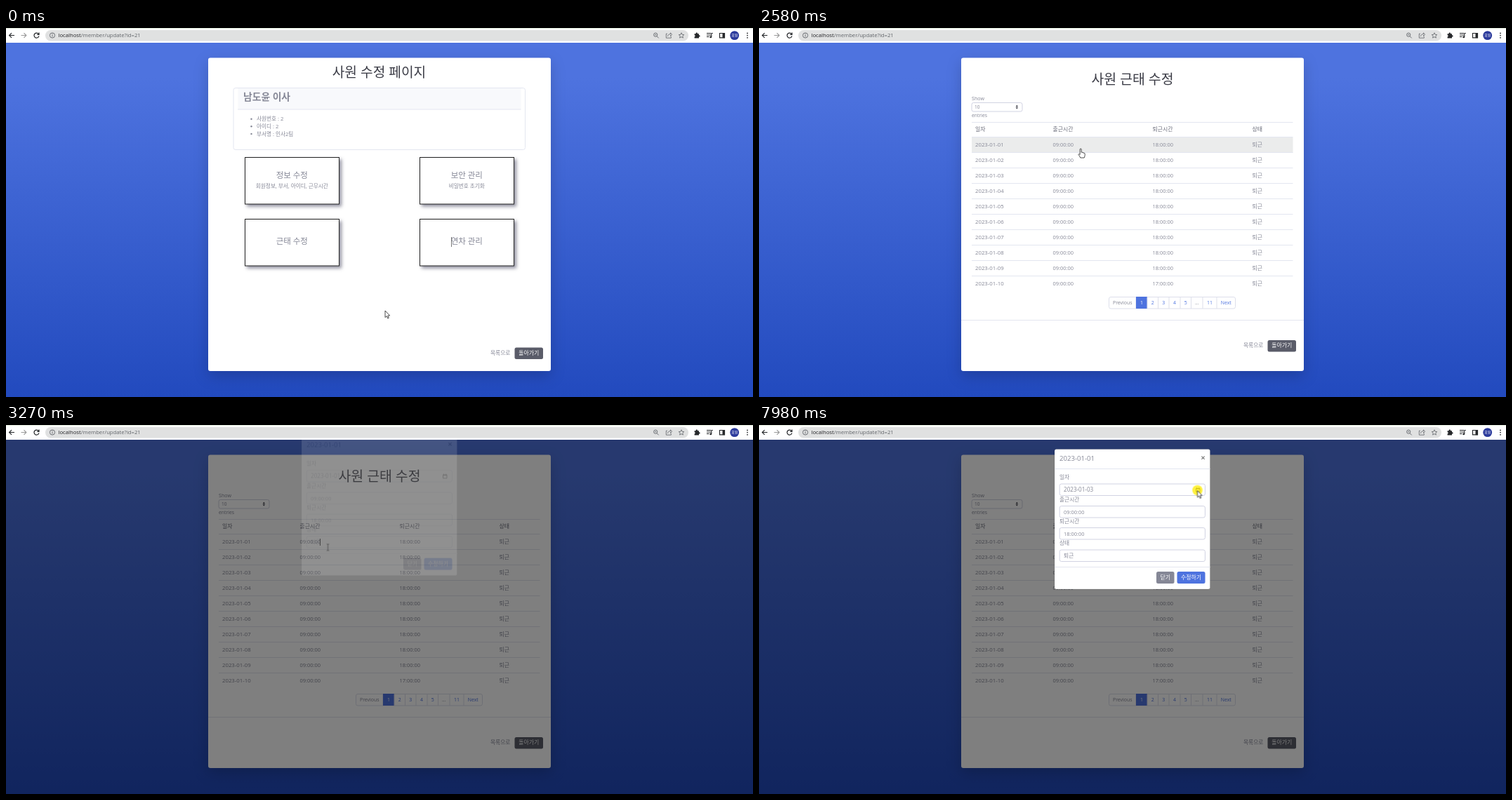
Write an HTML page that moves like this. It is 1064x526 px and loops after 8 s.

```html
<!DOCTYPE html>
<html lang="ko">
<head>
<meta charset="utf-8">
<title>사원 수정 페이지</title>
<style>
html, body { margin: 0; width: 100%; height: 100%; overflow: hidden; background: #fff; }
svg { display: block; width: 1064px; height: 526px; }
text { font-family: "Open Sans", "Noto Sans CJK KR", "Noto Sans CJK", sans-serif; white-space: pre; }
.mid { text-anchor: middle; }
.bold { font-weight: 700; }
.medium { font-weight: 500; }
.light { font-weight: 300; }
.calendar text { font-family: "Liberation Sans", "Noto Sans CJK KR", "Noto Sans CJK", sans-serif; }
.card { filter: drop-shadow(0 7px 10px rgba(0,0,0,.175)); }
.option { filter: drop-shadow(3.5px 3.5px 2.5px rgba(70,70,95,.6)); }
.popup { filter: drop-shadow(0 1px 2px rgba(0,0,0,.5)); }

/* One percent of the loop is 80 ms. */
.anim { animation: 8s step-end infinite; }
.first { animation-name: first; }
.second { animation-name: second; }
.caret { animation-name: caret; }
.row-caret { animation-name: rowCaret; }
.row-hover { animation-name: rowHover; }
.backdrop { animation-name: backdrop; animation-timing-function: linear; }
.modal { animation-name: fade, drop; animation-duration: 8s; animation-iteration-count: infinite;
  animation-timing-function: linear, ease-out; }
.calendar { animation-name: calendar; }
.day-hover { animation-name: dayHover; }
.old-date { animation-name: oldDate; }
.new-date { animation-name: newDate; }
.pointer { animation-name: pointer; animation-timing-function: ease-in-out; }
.arrow { animation-name: arrow; }
.hand { animation-name: hand; }
.beam { animation-name: beam; }
.press { animation-name: press; }

@keyframes first { 0% { opacity: 1 } 17.625%, 100% { opacity: 0 } }
@keyframes second { 0% { opacity: 0 } 17.625%, 100% { opacity: 1 } }
@keyframes caret { 0% { opacity: 1 } 6.5%, 100% { opacity: 0 } }
@keyframes rowCaret { 0% { opacity: 0 } 38%, 100% { opacity: 1 } }
@keyframes rowHover {
  0%, 24.25% { opacity: 1; transform: translateY(153.6px); animation-timing-function: steps(7) }
  27% { opacity: 0; transform: none }
  30.9%, 38.6% { opacity: 1; transform: none }
  38.7%, 100% { opacity: 0; transform: none }
}
@keyframes backdrop { 0%, 38.6875% { opacity: 0 } 40.5625%, 100% { opacity: .5 } }
@keyframes fade { 0%, 40.625% { opacity: 0 } 42.5%, 100% { opacity: 1 } }
@keyframes drop { 0%, 40.625% { transform: translateY(-22px) } 44.375%, 100% { transform: none } }
@keyframes calendar { 0% { opacity: 0 } 66% { opacity: 1 } 82.25%, 100% { opacity: 0 } }
@keyframes dayHover {
  0% { opacity: 0; transform: none }
  72.3% { opacity: 1; transform: none }
  74.5%, 100% { opacity: 1; transform: translateX(-12.55px) }
}
@keyframes oldDate { 0% { opacity: 1 } 82.25%, 100% { opacity: 0 } }
@keyframes newDate { 0% { opacity: 0 } 82.25%, 100% { opacity: 1 } }
@keyframes pointer {
  0%, 11.5% { transform: translate(540px, 403px) }
  15.875%, 24.25% { transform: translate(433.5px, 321.5px) }
  28% { transform: translate(452px, 63px) }
  32.25%, 39.5% { transform: translate(458px, 172px) }
  40.5%, 50.75% { transform: translate(458.5px, 173.5px) }
  57.625%, 69.25% { transform: translate(622px, 92.5px) }
  73.5% { transform: translate(472px, 141px) }
  76.125%, 88% { transform: translate(463px, 141px) }
  93.75% { transform: translate(633px, 98px) }
  97.25%, 100% { transform: translate(624.5px, 93.5px) }
}
@keyframes arrow {
  0% { opacity: 1 } 15.25% { opacity: 0 } 27% { opacity: 1 } 30.9% { opacity: 0 }
  38.7% { opacity: 1 } 40% { opacity: 0 } 42.5%, 100% { opacity: 1 }
}
@keyframes hand {
  0% { opacity: 0 } 15.25% { opacity: 1 } 27% { opacity: 0 } 30.9% { opacity: 1 } 38.7%, 100% { opacity: 0 }
}
@keyframes beam { 0% { opacity: 0 } 40% { opacity: 1 } 42.5%, 100% { opacity: 0 } }
@keyframes press {
  0% { opacity: 0 } 16.75% { opacity: .8 } 17.625% { opacity: 0 }
  38% { opacity: .8 } 38.6875% { opacity: 0 }
  64.25% { opacity: .8 } 66.875% { opacity: 0 }
  80.5% { opacity: .8 } 83.125% { opacity: 0 }
  98.125%, 100% { opacity: .8 }
}
</style>
</head>
<body>
<svg id="stage" viewBox="0 0 1064 526">
  <defs>
    <linearGradient id="sky" x1="0" y1="0" x2="0" y2="1">
      <stop offset=".1" stop-color="#4e73df"/><stop offset="1" stop-color="#224abe"/>
    </linearGradient>
  </defs>
</svg>
<script>
const GREY = '#858796', BLUE = '#4e73df', LINE = '#e3e6f0', FIELD = '#d1d3e2', DARK = '#5a5c69';

const text = (x, y, s, size = 7.7, fill = GREY, cls = '') =>
  `<text x="${x}" y="${y}" font-size="${size}" fill="${fill}" class="${cls}">${s}</text>`;
const mid = (x, y, s, size, fill, cls = '') => text(x, y, s, size, fill, 'mid ' + cls);
const rect = (x, y, w, h, fill, attrs = '') =>
  `<rect x="${x}" y="${y}" width="${w}" height="${h}" fill="${fill}" ${attrs}/>`;
const path = (d, stroke, width = 1, attrs = 'fill="none"') =>
  `<path d="${d}" stroke="${stroke}" stroke-width="${width}" ${attrs}/>`;
const rule = (x1, x2, y, color = LINE) => path(`M${x1} ${y}H${x2}`, color);
const group = (cls, ...parts) => `<g class="${cls}">${parts.join('')}</g>`;
const list = (n, make) => Array.from({ length: n }, (_, i) => make(i)).join('');

const footer = y =>
  text(690, y + 2.8, '목록으로') +
  rect(724.5, y - 7.5, 40.5, 16.5, DARK, 'rx="2.5"') +
  mid(744.8, y + 2.8, '돌아가기', 7.9, '#fff');

const option = (x, y, title, note) =>
  rect(x + .5, y + .5, 134, 66.5, '#fff', 'stroke="#222" class="option"') +
  mid(x + 67.3, y + (note ? 29.5 : 36), title, 11.5) +
  (note ? mid(x + 67.3, y + 44, note, 7.65) : '');

const firstPage = () => group('anim first',
  mid(531.5, 70, '사원 수정 페이지', 19.2, '#3a3b45', 'light'),
  rect(324, 85.5, 415.5, 88, '#fff', `rx="3" stroke="${LINE}"`),
  rect(330.5, 86, 403, 30, '#f8f9fc'), rule(330, 733.5, 116),
  text(338, 102.5, '남도윤 이사', 13.8, GREY, 'bold'),
  ['사원번호 : 2', '아이디 : 2', '부서명 : 인사2팀'].map((s, i) =>
    `<circle cx="349.5" cy="${129.7 + i * 10.6}" r="1.2" fill="${GREY}"/>` +
    text(357, 132.3 + i * 10.6, s, 7.6)).join(''),
  option(340, 184, '정보 수정', '회원정보, 부서, 아이디, 근무시간'),
  option(589, 184, '보안 관리', '비밀번호 초기화'),
  option(340, 272, '근태 수정'),
  option(589, 272, '연차 관리'),
  rect(634, 298, 1, 14, '#777', 'class="anim caret"'),
  footer(463));

const tableRow = i => {
  const y = 169.3 + i * 21.95;
  return rule(303, 760.5, Math.round(156 + i * 21.95) - .5) +
    text(308, y, `2023-01-${String(i + 1).padStart(2, '0')}`, 7.8) +
    text(418.5, y, '09:00:00', 7.45) +
    text(560.5, y, i === 9 ? '17:00:00' : '18:00:00', 7.45) +
    text(702.5, y, '퇴근', 7.8);
};

const pager = () => {
  const labels = ['Previous', '1', '2', '3', '4', '5', '...', '11', 'Next'];
  const edges = [498.5, 537, 553, 568.5, 584, 600, 615.5, 632, 652, 678.5];
  return rect(498.5, 383.5, 180, 16.5, '#fff', 'rx="2.5" stroke="#dddfeb"') +
    labels.map((s, i) => {
      const active = s === '1', left = edges[i], width = edges[i + 1] - left;
      const color = active ? '#fff' : i === 0 || s === '...' ? GREY : BLUE;
      return (i ? path(`M${left} 383.5V400`, '#dddfeb') : '') +
        (active ? rect(left, 383, width, 17, BLUE) : '') +
        mid(left + width / 2, 394, s, 6.9, color);
    }).join('');
};

const secondPage = () => group('anim second',
  mid(532, 79.5, '사원 근태 수정', 19.4, '#3a3b45', 'light'),
  text(303, 102.6, 'Show', 7.1), text(303, 127, 'entries', 6.8),
  rect(303, 106.5, 72, 12.5, '#fff', `rx="2.5" stroke="${FIELD}"`),
  text(307, 115, '10', 6.6),
  '<path d="M365.6 112.2L367.3 109.8L369 112.2ZM365.6 113.2L367.3 115.6L369 113.2Z" fill="#3a3b45"/>',
  rule(303, 760.5, 134.5),
  [[308, '일자'], [418.5, '출근시간'], [560.5, '퇴근시간'], [702.5, '상태']]
    .map(([x, s]) => text(x, 147, s, 7.9, '#6a6c7a', 'medium')).join(''),
  rect(303, 156, 457.5, 22, '#ebecec', 'class="anim row-hover"'),
  list(10, tableRow),
  rect(447, 162, 1, 10, '#555', 'class="anim row-caret"'),
  pager(), rule(288, 776, 416.5), footer(452.5));

const field = (y, label, value) =>
  text(428, y - 15, label) +
  rect(428.2, y - 8, 207.2, 16.5, '#fff', `rx="2.5" stroke="${FIELD}"`) + value;

const modal = () => group('anim modal',
  rect(421, 34.5, 221.5, 199.5, '#fff', 'rx="2.5" stroke="#000" stroke-opacity=".2" stroke-width=".6"'),
  text(428, 51.2, '2023-01-01', 9.6),
  path('M630.4 44.7l4.2 4.2m0-4.2l-4.2 4.2', '#777', 1.2),
  rule(421, 642.5, 62.5),
  field(92, '일자',
    text(434, 95, '2023-01-01', 8.1, GREY, 'anim old-date') +
    text(434, 95, '2023-01-03', 8.1, GREY, 'anim new-date')),
  path('M622.5 90.5h5.5v4.8h-5.5zM622.5 91h5.5M623.7 89v1.5M626.8 89v1.5', '#222', .9),
  field(123.5, '출근시간', text(434, 126.5, '09:00:00', 7.45)),
  field(154.5, '퇴근시간', text(434, 157.5, '18:00:00', 7.45)),
  field(186, '상태', text(434, 188.8, '퇴근', 7.8)),
  rule(421, 642.5, 202.5),
  rect(566, 209, 25.5, 17, GREY, 'rx="2.5"'), mid(578.7, 220.4, '닫기', 7.9, '#fff'),
  rect(595.5, 209, 40, 17, BLUE, 'rx="2.5"'), mid(615.4, 220.4, '수정하기', 7.9, '#fff'));

const day = i => {
  const next = i > 30, number = next ? i - 30 : i + 1;
  const color = i === 0 ? '#fff' : next ? '#777' : '#111';
  return mid(439 + i % 7 * 12.55, 142.5 + Math.floor(i / 7) * 12.55, number, 5.7, color, i ? '' : 'bold');
};

const calendar = () => group('anim calendar',
  rect(428.5, 101.5, 97, 125, '#fff', 'stroke="#8a8a8a" stroke-width=".8" class="popup"'),
  text(433, 114.2, '2023년 01월', 5.7, '#111', 'bold'),
  '<path d="M464.5 111.2h3.6l-1.8 2.1z" fill="#111"/>',
  path('M500 116v-7.5m-3 3l3-3l3 3M514 108.5v7.5m-3-3l3 3l3-3', '#333', .8),
  [...'일월화수목금토'].map((s, i) => mid(439 + i * 12.55, 129.3, s, 5.7, '#111')).join(''),
  rect(433, 134.5, 11.8, 12, '#0075ff', 'stroke="#123" stroke-width=".9"'),
  rect(470.8, 134.5, 11.8, 12, '#b0d0fb', 'stroke="#234" stroke-width=".9" class="anim day-hover"'),
  list(42, day),
  mid(443.5, 219.8, '삭제', 5.8, '#1a7ae0'), mid(510.2, 219.8, '오늘', 5.8, '#1a7ae0'));

const toolbar = () => {
  const ink = '#26282b', soft = '#5f6368';
  return rect(0, 0, 1064, 21, '#fff') + rect(0, 0, 1064, 1, '#dfe8d8') +
    rect(56, 3, 916, 15.5, '#e0e1e1', 'rx="7.75"') +
    path('M12 10.5H4.7m3.3-3.4l-3.4 3.4l3.4 3.4', ink, 1.2) +
    path('M21.5 10.5h7.3m-3.3-3.4l3.4 3.4l-3.4 3.4', '#999', 1.1) +
    path('M46.4 8.6a3.5 3.5 0 1 0 .5 2.8M47 6.6v2.7h-2.7', ink, 1.2) +
    path('M69.6 10.5a3.6 3.6 0 1 0-7.2 0a3.6 3.6 0 1 0 7.2 0M66 9.8v2.6M66 8.2v1', soft, .9) +
    `<text x="74.5" y="13.4" font-size="7.7" fill="${soft}"><tspan fill="#202124">localhost</tspan>/member/update?id=21</text>` +
    path('M927.8 9.7a2.6 2.6 0 1 0-5.2 0a2.6 2.6 0 1 0 5.2 0M927 11.7l2.7 2.7M924 9.7h2.4', soft, .9) +
    path('M942 8.2h-1.7v6h7v-2M942.5 12c.2-2.4 1.8-3.4 4-3.4v-1.8l2 2.5l-2 2.4v-1.6', soft, .8) +
    path('M962 6.8l1.1 2.5l2.7.3l-2 1.8l.6 2.7l-2.4-1.4l-2.4 1.4l.6-2.7l-2-1.8l2.7-.3z', soft, .8) +
    `<path d="M980.6 8.2h2v-.4a1.2 1.2 0 0 1 2.4 0v.4h2v2h.4a1.2 1.2 0 0 1 0 2.4h-.4v2h-6.4v-2.2a1.1 1.1 0 0 0 0-2.2z" fill="${ink}"/>` +
    path('M998 7.5h6M998 10h6M998 12.5h3.5M1004.8 7.2v5.6M1004.8 7.5h2', ink, 1.1) +
    `<circle cx="1003.8" cy="12.9" r="1.4" fill="${ink}"/>` +
    path('M1016.5 7.5h7v6.4h-7z', ink, 1.2) + rect(1020.5, 7, 3.4, 7.2, ink) +
    '<circle cx="1037.7" cy="10.6" r="6.4" fill="#2b3a9c"/>' + mid(1037.7, 12.4, '회원', 4.8, '#fff') +
    list(3, i => `<circle cx="1056" cy="${7.4 + i * 3.2}" r=".9" fill="${ink}"/>`);
};

const pointer = () => group('anim pointer',
  '<circle cy="-.5" r="7.3" fill="#ffee10" class="anim press"/>',
  path('M0 0V9.6L2.2 7.6L3.8 11L5.3 10.3L3.8 7H6.7Z', '#222', .8, 'fill="#fff" class="anim arrow"'),
  path('M-.8 7.5V1A1 1 0 0 1 1.2 1V5.2Q3 4.6 3 5.8Q4.6 5.2 4.7 6.4Q6.2 6 6.2 7.4V9.5Q6 11 5.2 13H-.2Q-1 11-3 8.4Q-2.7 6.6-.8 8.4Z',
    '#222', .8, 'fill="#fff" class="anim hand"'),
  path('M-1.6-3.8Q0-3.8 0-3V5Q0 5.6-1.6 5.6M1.6-3.8Q0-3.8 0-3M0 5Q0 5.6 1.6 5.6', '#444', .8, 'fill="none" class="anim beam"'));

document.getElementById('stage').insertAdjacentHTML('beforeend', [
  rect(0, 21, 1064, 505, 'url(#sky)'),
  rect(288, 42.5, 488, 446.5, '#fff', 'rx="3" class="card"'),
  firstPage(), secondPage(),
  rect(0, 21, 1064, 505, '#000', 'class="anim backdrop"'),
  modal(), calendar(), toolbar(), pointer()
].join(''));
</script>
</body>
</html>
```
